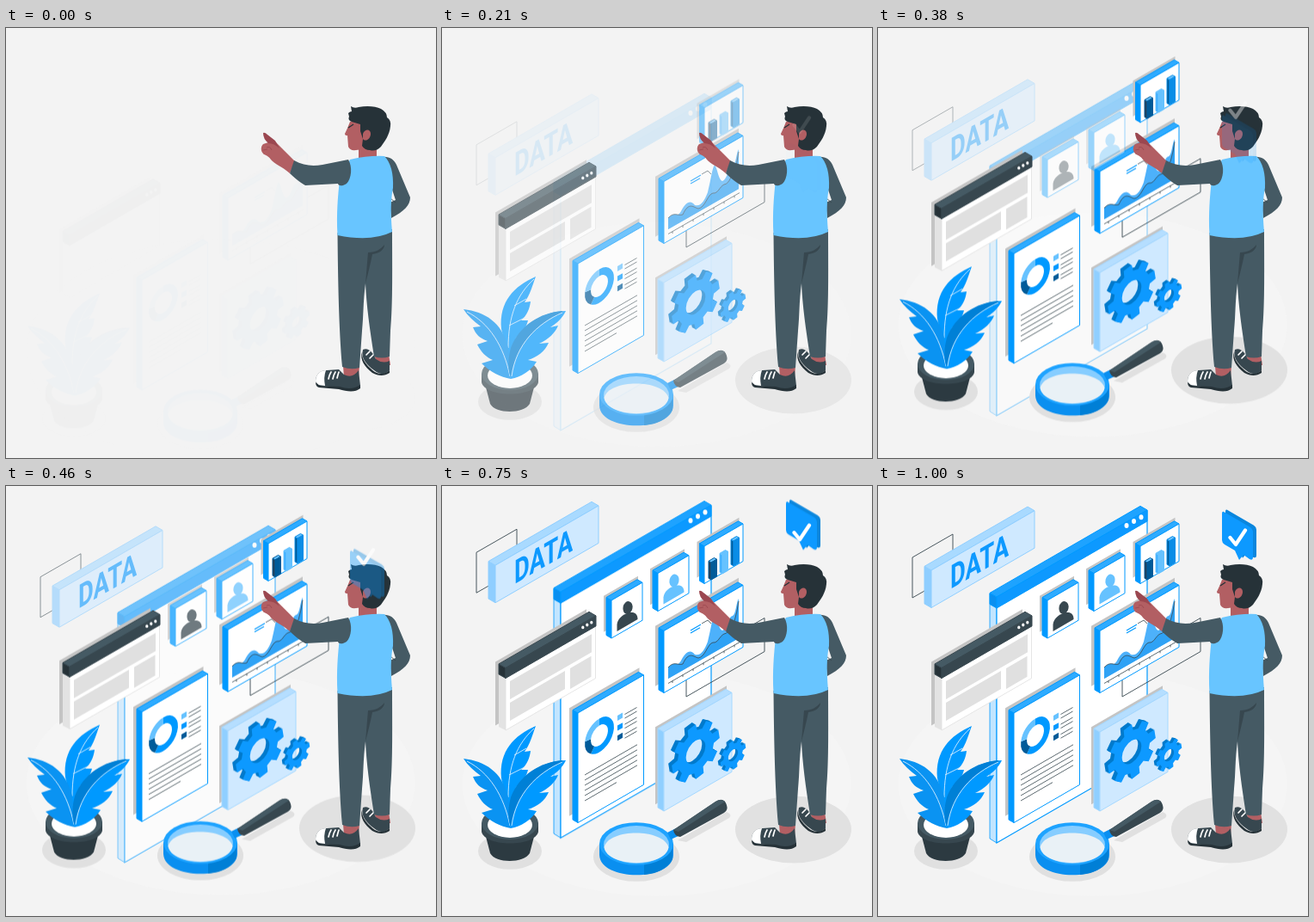
These frames come from a looping animation (500x500 px, 1.04 s). An HTML page:

```html
<!DOCTYPE html>
<html lang="en">
<head>
<meta charset="utf-8">
<title>Data panels</title>
<style>
  html, body { margin: 0; width: 100%; height: 100%; overflow: hidden; background: #f3f3f3; }
  svg { display: block; width: 100%; height: 100%; }
  @keyframes rise {
    from { opacity: 0; transform: translateY(var(--d, 30px)); }
    to { opacity: 1; transform: none; }
  }
  .a, .b, .c { animation: rise 542ms cubic-bezier(.36, -.01, .5, 1.38) both paused; }
  .b { --d: 60px; animation-duration: 1041ms; animation-timing-function: cubic-bezier(.56, 0, .45, 1.5); }
  .c { --d: 33px; animation-delay: 237ms; }
  .far { --d: 38px; }
  .wire { fill: none; stroke: #37474f; stroke-width: .9; }
  .ink { fill: none; stroke: #37474f; stroke-width: .8; }
  .rib { fill: none; stroke: #d9efff; stroke-width: .9; }
  .crease { fill: none; stroke: #9b4750; stroke-width: .8; }
  .lace { fill: none; stroke: #fff; stroke-width: 1.7; stroke-linecap: round; }
  .word { font: bold 38px Roboto, Arial, sans-serif; fill: #0d99ff; }
</style>
</head>
<body>
<svg id="stage" viewBox="0 0 500 500"></svg>
<script>
const BLUE = '#0099ff', PALE = '#66c2ff', NAVY = '#005b99', DARK = '#37474f', SLATE = '#455a64',
  INK = '#263238', SKIN = '#b25f63', GREY = '#e0e0e0', SHADE = '#c4c4c4';
const K = Math.tan(Math.PI / 6);

const path = (d, fill, more = '') => `<path d="${d}" fill="${fill}" ${more}/>`;
const ellipse = (x, y, rx, ry, fill, more = '') =>
  `<ellipse cx="${x}" cy="${y}" rx="${rx}" ry="${ry}" fill="${fill}" ${more}/>`;
const disc = (x, y, r, fill) => ellipse(x, y, r, r * K, fill);
const line = (d, cls) => `<path class="${cls}" d="${d}"/>`;
const group = (cls, ...parts) => `<g class="${cls}">${parts.join('')}</g>`;

// Isometric wall: x, y is the top left corner, the top edge climbs to the right
const wall = (x, y, w, h, fill, more) =>
  path(`M${x} ${y}l${w} ${-w * K}v${h}l${-w} ${w * K}z`, fill, more);

// Wall with a visible thickness d on its left and top, and an optional shadow behind it
function slab(x, y, w, h, d, o = {}) {
  const e = d * K, side = o.side || BLUE, edge = o.edge || BLUE, s = o.shade;
  const rim = `stroke="${edge}" stroke-width="1" stroke-linejoin="round"`;
  return (s ? wall(x - d - s, y - e - s * K, w + s + 1, h - 2, SHADE) : '') +
    path(`M${x} ${y}l${-d} ${-e}v${h}l${d} ${e}z`, side, rim) +
    path(`M${x} ${y}l${-d} ${-e}l${w} ${-w * K}l${d} ${e}z`, o.top || '#2eabff', rim) +
    wall(x, y, w, h, o.front || '#fff', rim);
}

const dots = (x, y, step, r) => [0, 1, 2].map(i =>
  ellipse(x + i * step, y - i * step * K, r, r * 1.2, '#fff')).join('');

function gear(x, y, r, hole, depth) {
  const pts = [];
  for (let i = 0; i < 8; i++)
    [[-.25, .76], [-.17, 1], [.17, 1], [.25, .76]].forEach(([t, k]) => {
      const a = i * Math.PI / 4 + t - .17;
      pts.push(`${(r * k * Math.cos(a)).toFixed(1)} ${(r * k * Math.sin(a)).toFixed(1)}`);
    });
  const d = `M${pts.join('L')}zM${hole} 0a${hole} ${hole} 0 1 0 ${-2 * hole} 0a${hole} ${hole} 0 1 0 ${2 * hole} 0z`;
  let out = '';
  for (let i = depth; i >= 0; i--)
    out += path(d, i ? '#007acc' : '#0d99ff',
      `fill-rule="evenodd" transform="matrix(.87 -.5 0 1 ${x - i} ${y - i * K})"`);
  return out;
}

// Arc of the ring chart, from and to in turns
function arc(from, to, color) {
  const p = t => `${15.5 * Math.sin(t * 2 * Math.PI)} ${-15.5 * Math.cos(t * 2 * Math.PI)}`;
  return `<path d="M${p(from)}A15.5 15.5 0 ${to - from > .5 ? 1 : 0} 1 ${p(to)}" fill="none" stroke="${color}" stroke-width="8"/>`;
}

function browser() {
  return wall(62, 204.5, 106, 74, SHADE) +
    path('M66 217l8 5v62l-8-4z', '#e3e3e3') +
    wall(74, 222, 104.5, 62, '#fff', 'stroke="#e0e0e0" stroke-width=".8"') +
    wall(79, 227, 95, 21, GREY) + wall(79, 252, 64, 21, GREY) + wall(149, 212, 24.5, 24, GREY) +
    slab(74, 211.5, 105, 12, 8, { side: INK, top: SLATE, front: DARK, edge: DARK }) +
    dots(163.8, 164.4, 5, 1.6);
}

function report() {
  const rows = [0, 1, 2, 3, 4, 5].map(i => {
    const w = i < 5 ? 61 : 37;
    return `M166 ${336 + i * 6}l${w} ${-w * K}`;
  }).join('');
  const legend = [PALE, BLUE, NAVY].map((c, i) => {
    const y = 267 + i * 11.6;
    return wall(204, y, 6, 6, c) + line(`M212.5 ${y - 1.5}l14 -8m0 4.5l-14 8`, 'ink');
  }).join('');
  return slab(158, 264, 76.5, 127.5, 6, { shade: 4 }) +
    `<g transform="matrix(.866 -.5 0 1 183 290)">${arc(0, .6, BLUE)}${arc(.6, .77, NAVY)}${arc(.77, 1, PALE)}</g>` +
    legend + line(rows, 'ink');
}

function chart() {
  const ticks = [0, 1, 2, 3, 4, 5, 6].map(i => `M${268 + i * 12} ${226.5 - i * 12 * K}v2.5`).join('');
  const curve = 'M263 211C270 203 274 209 280 207C287 191 293 199 298 200C306 199 309 183 315 182C321 183 323 174 328 172C335 171 336 160 340 157Q343 147 345 134';
  return slab(258, 168.5, 92, 72, 6, { shade: 4 }) +
    path('M263 213C269 203 273 212 278 203C285 190 290 191 294 196C301 198 305 191 309 181C313 165 315 149 317 150C320 151 321 166 326 168C332 166 333 151 338 151C342 149 342 135 345 131V177L263 224Z', '#4db1fb') +
    path(`${curve}V177L263 224Z`, '#2fa2f5') +
    line(curve, 'ink') +
    line(`M263 229.5L346 181.6${ticks}`, 'ink') +
    path('M289 168l12-7M289 171l11-6.3', 'none', `stroke="${BLUE}" stroke-width="1.2"`) +
    line('M302 160l7-4l4 4', 'ink');
}

function bars() {
  const bar = (x, y, h, c, s) => slab(x + 3, y, 6.5, h, 3, { front: c, side: s, top: PALE, edge: c });
  return slab(305, 70, 45, 43.5, 5.5, { shade: 3 }) +
    bar(310, 89, 20, NAVY, '#263f55') + bar(323, 80, 22, PALE, '#3daeff') + bar(336, 64, 29, '#0a8de6', NAVY);
}

function card(x, y, c) {
  return `<g transform="translate(${x} ${y})">` +
    slab(197, 133, 36, 44, 6, { shade: 3 }) +
    ellipse(216, 141.5, 5.5, 7.5, c, 'transform="rotate(12 216 141.5)"') +
    path('M203.5 169V161C204 154 211 149 217 147.5C223 146 227.500 148 227.500 155Z', c) + '</g>';
}

function plant() {
  return disc(79, 424.5, 37, GREY) +
    path('M49 400L56 427C62 439 95 439 102 427L109 400Z', '#2c3a41') +
    path('M46 392V402C50 420 108 420 112 402V392Z', DARK) +
    disc(79, 392, 33, SLATE) + disc(79, 394, 26, '#fff') +
    path('M109 279C84 290 66 308 69 340L76 368L80 382L86 350C94 344 98 338 100 330L92 330C99 324 102 316 103 308L96 309C102 301 105 290 109 279Z', BLUE) +
    line('M107 282C87 300 77 325 77 362M78 336l18-9M84 313l14-8', 'rib') +
    path('M25 317C50 320 70 332 77 362L80 398C68 396 56 390 46 380L59 376C51 373 45 366 41 358L53 354C44 351 39 346 36 338L45 337C37 331 30 325 25 317Z', '#0a93f2') +
    line('M29 320C55 333 72 360 79 395', 'rib') +
    path('M144 319C116 320 90 336 80 362C76 376 77 388 80 398C92 396 104 388 110 378L100 376C110 373 120 366 124 356L113 357C124 352 132 344 135 336L126 338C134 333 140 327 144 319Z', BLUE) +
    path('M140 319C114 321 90 336 80 362C76 376 77 388 80 396C86 358 110 333 140 321Z', '#0080d6') +
    line('M140 321C110 334 86 358 81 395', 'rib');
}

function lens() {
  return disc(226, 431, 50, GREY) +
    path('M274 412L331 379Q338 382 334 386L284 414Z', GREY) +
    path('M183 416V429C184 460 268 460 269 429V416Z', '#0a8ff0') +
    path('M235 439V452Q259 450 268 434V418Z', '#007fd6') +
    disc(226, 416, 43, '#1ea3ff') +
    disc(226, 417, 38, '#86cdff') +
    path('M188.5 420C194 398 257 398 263.5 420C260 444 192 444 188.5 420Z', '#e9f1f6') +
    path('M262 403L272 398L277 406L266 411Z', '#0a8ff0') +
    path('M269 400L318 367Q328 361 331 371Q333 377 328 380L277 408Q270 407 269 400Z', DARK) +
    path('M269 400L318 367Q324 363 329 367L275 402Z', SLATE);
}

function person() {
  return path('M437 150C446 149 451 153 454 159L470 197C470 206 463 213 448 221L446 203L453 200L448 185Z', SLATE) +
    line('M447 198l6 5', 'ink') +
    path('M392 393H411L410 406H393ZM428 379H445L447 392L432 393Z', SKIN) +
    path('M415 374C421 371 427 377 430 385Q438 391 446 387L446 398C440 404 434 403 428 398C420 392 412 384 415 374Z', DARK) +
    path('M414 377C413 386 422 395 429 400Q438 405 446 398V401C440 405 433 405 426 401C417 394 411 385 414 377Z', INK) +
    line('M419 380l4-4M423 384l4-4', 'lace') +
    path('M360 411C360 402 366 398 373 398L387 397L393 403Q403 408 410 398L412 416C407 422 397 421 388 418L364 416Z', DARK) +
    path('M360 411C360 402 366 398 372 398Q369 406 371 416L363 415Z', '#fff') +
    path('M360 412L365 416L388 417Q402 422 412 415V419C406 424 397 423 387 420L364 418Q360 417 360 412Z', INK) +
    line('M375 408q1-5 3-8M380 408q1-5 3-8M385 407q1-4 2-7', 'lace') +
    path('M385.500 238L449 234C449 275 450 320 447 352L446 382Q437 385 428 382C423 350 419 322 418 297C415 320 416 332 414 352L411 395Q401 398 391 394C387 350 386 290 385.500 238Z', SLATE) +
    path('M421 261C430 261 436 257 440 252C440 258 434 262 426 263Q423 278 418 297Z', DARK) +
    path('M410 136L431 138V152Q421 156 410 152Z', SKIN) +
    path('M400 153Q422 148 440 149Q451 160 450 186Q446 205 449 237Q425 249 385.500 241C384 215 386 195 388 176Z', '#68c5ff') +
    path('M314 133L321 140L336 155L330 169C321 161 312 158 308 153C304 147 300 148 299 146C296 143 296 138 299 135L308 132Z', SKIN) +
    path('M299 122Q301 121 304 124L313 131L318 140Q312 134 305 134Q299 129 299 122Z', '#9b4750') +
    line('M303 139q4-2 6 3M299 142l5-1', 'crease') +
    path('M335 154C346 160 356 161 368 159L398 153C403 161 402 175 396 181C390 185 386 183 386 181L348 183C340 178 335 174 330 169Z', SLATE) +
    path('M400 109C398 114 396 119 394 123Q394 125 397 125L398 138Q400 143 407 142L415 141L421 117L413 105Z', SKIN) +
    path('M398 116l6-4', 'none', `stroke="${INK}" stroke-width="1.3"`) +
    path('M402 109Q397 107 399 103L398 99Q400 97 402 97L401 91Q405 94 410 92C420 90 430 91 436 94Q443 98 443 104Q448 107 447 114C446 125 440 132 436 138Q430 144 423 142Q417 142 414 137L415 129L412 120V112Z', INK) +
    path('M415 123C417 117 424 117 424 123C424 129 418 133 415 129Z', SKIN);
}

function board() {
  return path('M130 125l8 5v285l-8-5z', '#c2e5ff', `stroke="${BLUE}" stroke-width=".8"`) +
    wall(138, 130, 175, 285, '#fff', `stroke="${BLUE}" stroke-width="1.2"`) +
    slab(138, 129, 175, 13, 8, { front: '#0d99ff', top: '#1ea3ff', side: '#0a8ff0' }) +
    dots(289, 46, 8.5, 2.5);
}

function sign() {
  return line('M54 122L40 130V83L87 56V84', 'wire') +
    slab(62, 98, 120, 43.5, 8, { front: '#cfe9ff', top: '#a9daff', side: '#8fceff', edge: '#8fceff' }) +
    '<text class="word" transform="matrix(.72 -.416 0 1 84 120)">DATA</text>';
}

function bubble() {
  const shape = 'M402 30L433 48Q436 50 436 53V83Q436 87 432 85L425 80L420 86L415 75L403 68Q400 66 400 63V32Q400 29 402 30Z';
  return group('b',
    group('b', path(shape, '#0a86dd', 'transform="translate(4 -2.3)"'), path(shape, '#0d99ff')),
    path('M409.5 60L416 68L427 51.5', 'none', 'stroke="#fff" stroke-width="4.2" stroke-linecap="round" stroke-linejoin="round"'));
}

document.getElementById('stage').innerHTML = [
  group('a', disc(249.7, 346.5, 226, '#f5f5f5'), disc(408.5, 399.5, 67.5, '#e1e1e1')),
  group('b', sign()),
  group('b', board()),
  group('a', line('M284 222V245L375 192.5V153.5L284 206Z', 'wire'), browser(), report(), chart(),
    slab(258, 286, 79, 92, 7, { front: '#cfe9ff', top: '#b5deff', side: '#90cfff', edge: '#a5d8ff', shade: 3 }),
    gear(295, 309, 32, 13, 4), gear(338.5, 313, 17, 6.5, 3)),
  group('a', group('a far', bars())),
  group('c', card(0, 0, DARK), card(54, -31.5, PALE)),
  group('a', plant(), lens()),
  person(),
  bubble()
].join('');

// The motion holds each pose for 1/24 s, rounded to 10 ms
const LOOP = 1040, STEP = 1000 / 24;
const moves = document.getAnimations();
const origin = performance.now();
let shown = -1;
function tick() {
  const t = (performance.now() - origin) % LOOP;
  let i = 24;
  while (i > 0 && Math.round(i * STEP / 10) * 10 > t) i--;
  if (i !== shown) {
    shown = i;
    moves.forEach(m => { m.currentTime = (i + 1) * STEP; });
  }
  requestAnimationFrame(tick);
}
tick();
</script>
</body>
</html>
```
